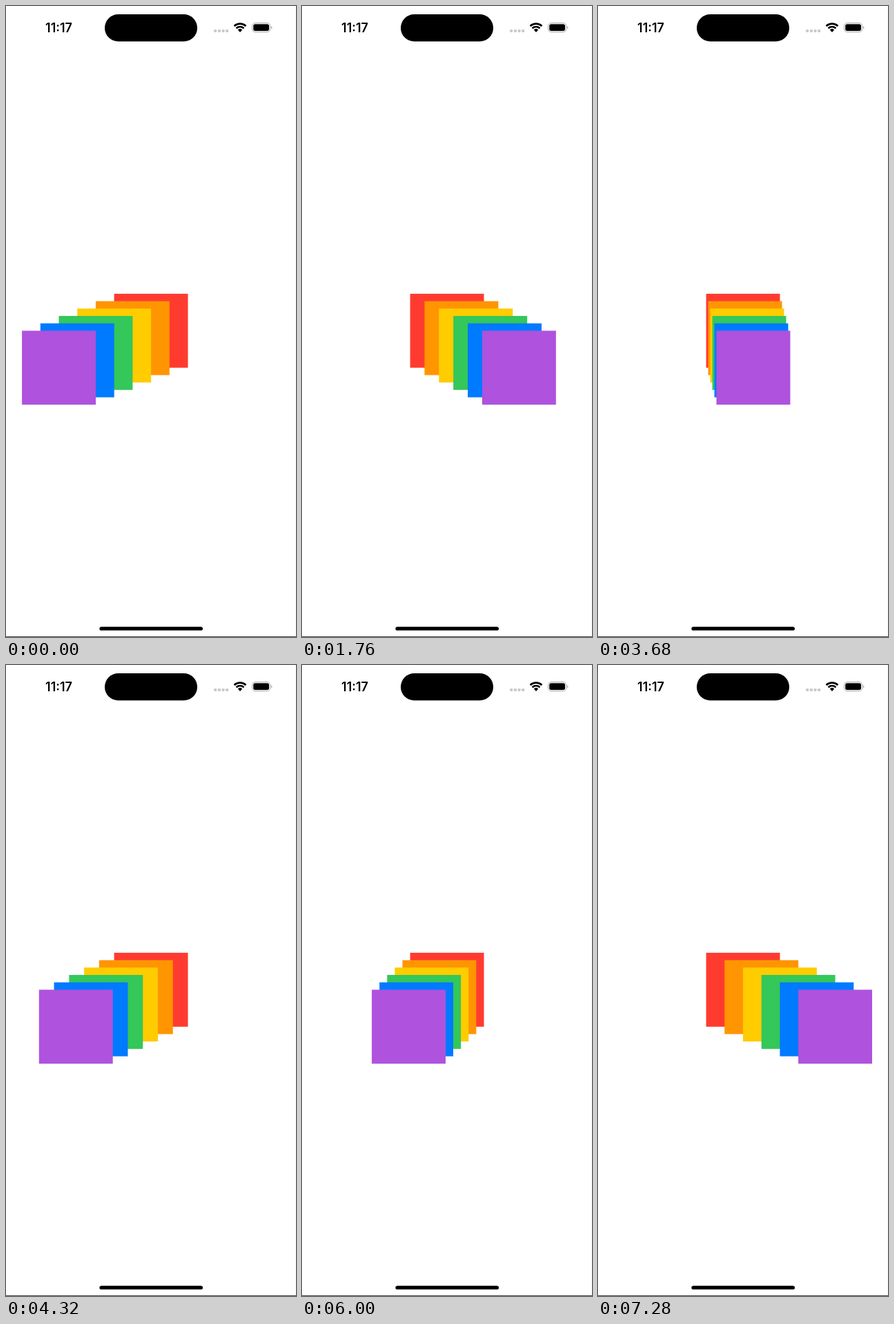
Recreate the animation shown at these times as an HTML page. Size 420 px wide and 912 px high, loop 7520 ms.

```html
<!DOCTYPE html>
<html lang="en">
<head>
<meta charset="utf-8">
<title>Fanned squares</title>
<style>
  html, body { margin: 0; width: 100%; height: 100%; overflow: hidden; background: #fff; }
  svg { display: block; width: 420px; height: 912px; }
  text { font: 600 18px Inter, "Liberation Sans", sans-serif; text-anchor: middle; }
</style>
</head>
<body>
<svg viewBox="0 0 420 912">
  <path d="M419.5 0V911" stroke="#f5f5f5"/>
  <path d="M0 911.5H420" stroke="#484848"/>

  <g id="squares"></g>

  <!-- status bar -->
  <text x="76.5" y="38">11:17</text>
  <rect x="143" y="12" width="134" height="39.3" rx="19.65"/>
  <g fill="#c9c9c9">
    <rect x="301.2" y="34" width="4" height="4" rx="1.2"/>
    <rect x="306.9" y="34" width="4" height="4" rx="1.2"/>
    <rect x="312.6" y="34" width="4" height="4" rx="1.2"/>
    <rect x="318.2" y="34" width="4" height="4" rx="1.2"/>
  </g>
  <g id="wifi" transform="translate(339 38)" fill="none" stroke="#000" stroke-width="2.7"></g>
  <rect x="356.6" y="24.6" width="26" height="13" rx="4.2" fill="none" stroke="#a6a6a6"/>
  <rect x="358.2" y="26.2" width="22.8" height="9.8" rx="2.7"/>
  <path d="M384 29v4.4q1.4-.6 1.4-2.2t-1.4-2.2z" fill="#a6a6a6"/>

  <!-- home indicator -->
  <rect x="135.4" y="897.2" width="149.6" height="5.4" rx="2.7"/>
</svg>
<script>
  const LOOP = 7520, TICK = 80, DURATION = 2000;
  const SIZE = 106.9, LEFT = 156.6, TOP = 415.9, RISE = 10.69, SPREAD = 26.7;
  const COLORS = ["#ff3b30", "#ff9500", "#ffcc00", "#34c759", "#007aff", "#af52de"];
  // Each move: start time, spread direction before and after
  const MOVES = [[221, -1, 1], [2745, 1, -1], [5251, -1, 1]];

  function add(parent, tag, attrs) {
    const el = document.createElementNS("http://www.w3.org/2000/svg", tag);
    for (const key in attrs) el.setAttribute(key, attrs[key]);
    return parent.appendChild(el);
  }

  const wifi = document.getElementById("wifi");
  for (const r of [12.4, 8]) {
    const x = r * 0.68, y = -r * 0.733;
    add(wifi, "path", { d: `M${-x} ${y}A${r} ${r} 0 0 1 ${x} ${y}` });
  }
  add(wifi, "path", { d: "M0 0L-3.2-3.4A4.7 4.7 0 0 1 3.2-3.4Z", fill: "#000", stroke: "none" });

  const group = document.getElementById("squares");
  const squares = COLORS.map((fill, i) =>
    add(group, "rect", { x: LEFT, y: TOP + i * RISE, width: SIZE, height: SIZE, fill }));

  // cubic-bezier(.42, 0, .58, 1)
  function easeInOut(x) {
    if (x <= 0) return 0;
    if (x >= 1) return 1;
    let lo = 0, hi = 1;
    for (let i = 0; i < 24; i++) {
      const u = (lo + hi) / 2;
      if (1.26 * u - 0.78 * u * u + 0.52 * u ** 3 < x) lo = u; else hi = u;
    }
    return lo * lo * (3 - 2 * lo);
  }

  function spreadAt(time) {
    let dir = -1;
    for (const [start, from, to] of MOVES)
      if (time >= start) dir = from + (to - from) * easeInOut((time - start) / DURATION);
    return dir * SPREAD;
  }

  function draw() {
    const time = Math.floor((performance.now() % LOOP) / TICK) * TICK;
    const step = spreadAt(time);
    squares.forEach((sq, i) => sq.setAttribute("x", (LEFT + i * step).toFixed(2)));
    requestAnimationFrame(draw);
  }
  draw();
</script>
</body>
</html>
```
